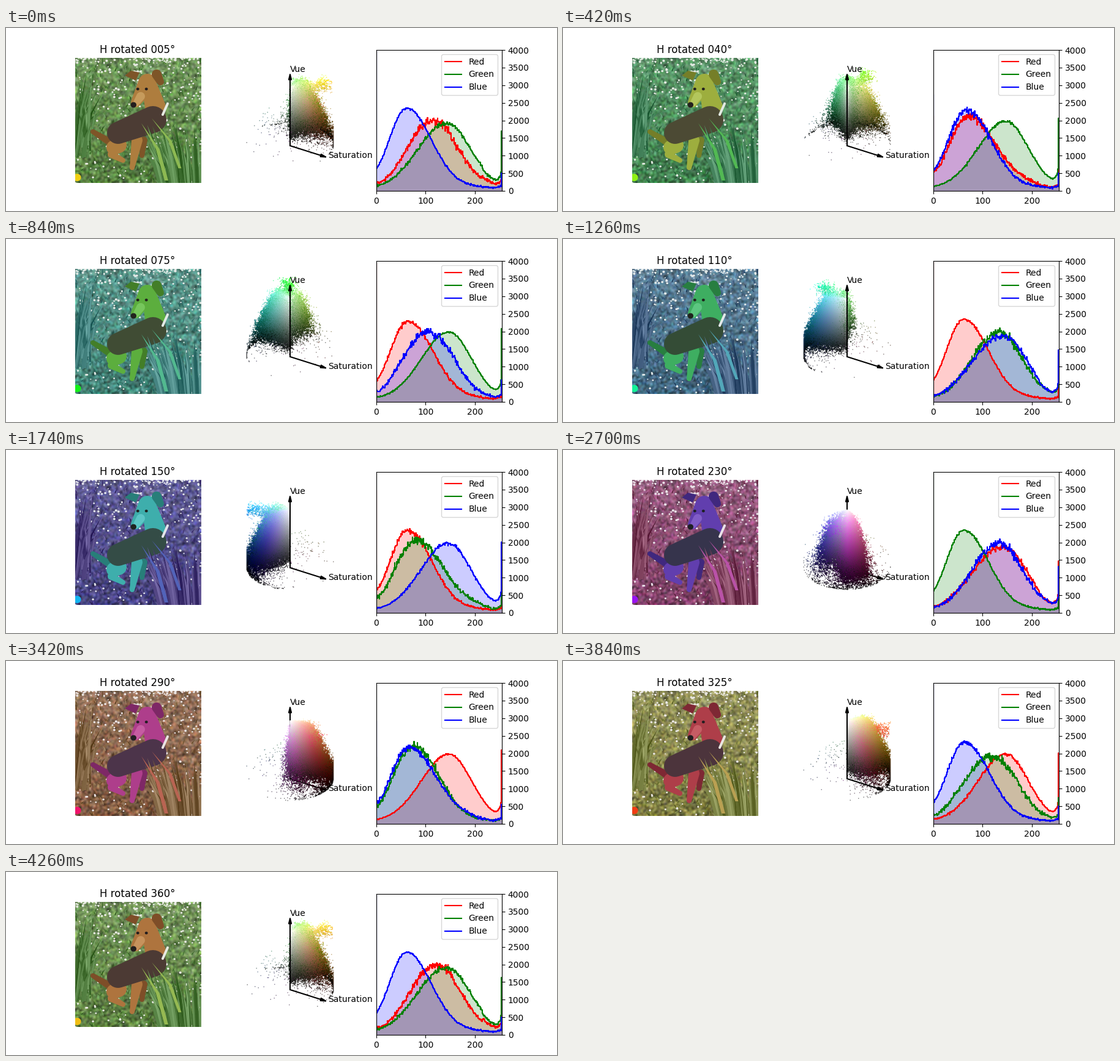
Write a matplotlib script that moves like this. It is 900 px wide and 300 px high and loops after 4.32 s.

```python
from itertools import product

import matplotlib.pyplot as plt
import numpy as np
from matplotlib.animation import FuncAnimation
from matplotlib.collections import PolyCollection
from matplotlib.colors import hsv_to_rgb, rgb_to_hsv
from matplotlib.patches import FancyArrowPatch, Rectangle

FRAMES, INTERVAL, STEP = 72, 60, 5
rng = np.random.default_rng(4)

fig = plt.figure(figsize=(9, 3), dpi=100)
stage = fig.add_axes([0, 0, 1, 1])
stage.axis("off")


def spin(hsv, deg):
    """Rotate the hue of an HSV array and return RGB."""
    out = np.array(hsv, float)
    out[..., 0] = (out[..., 0] + deg / 360) % 1
    return hsv_to_rgb(out)


# --- pixel population shared by the colour cloud and the histograms ---
N = 2 ** 17
WEIGHT = 2
LEVELS = np.arange(256)


def hump(peak, left, right):
    width = np.where(LEVELS < peak, left, right)
    return np.exp(-((LEVELS - peak) / width) ** 2 / 2)


def sample(z, pdf):
    """Give values ordered like z the distribution pdf."""
    rank = z.argsort().argsort() / N
    return np.searchsorted(np.cumsum(pdf) / pdf.sum(), rank, side="right")


def make_pixels():
    glow = np.exp((LEVELS - 255) / 6)
    high_pdf = 1980 * hump(148, 56, 46) + 60 + 500 * glow
    low_pdf = 2230 * hump(62, 35, 50) + 100 + 150 * glow
    high_pdf[0], high_pdf[-1] = 0, 2200
    low_pdf[0], low_pdf[-1] = 4500, 900

    z = rng.normal(size=N)
    high = sample(z, high_pdf)
    low = np.minimum(sample(0.86 * z + 0.51 * rng.normal(size=N), low_pdf), high)

    brown = rng.random(N) < 0.13
    hue = np.where(brown, 24, 80) + rng.normal(size=N) * (10 + 300 / (high + 20))
    yellow = (high > 215) & (rng.random(N) < 0.1)
    low[yellow] = rng.integers(0, 160, yellow.sum())
    hue[yellow] = rng.normal(48, 6, yellow.sum())
    hue += 220 * rng.normal(size=N) / (high - low + 6)
    stray = (high < 110) & (rng.random(N) < 0.01)
    hue[stray] = rng.uniform(0, 360, stray.sum())
    return np.column_stack([hue / 360 % 1, (high - low) / np.maximum(high, 1), high / 255])


pixels = make_pixels()

# --- picture: flat shapes over a soft meadow ---
X0, X1, Y0, Y1 = 113, 319, 49, 254
FUR, SHADE, LIGHT = (174, 116, 62), (126, 78, 40), (198, 146, 92)
VEST, DARK, WHITE = (76, 58, 52), (36, 30, 30), (232, 234, 226)
YELLOW, SPROUT = (240, 190, 20), (150, 185, 82)
shapes, tones = [], []


def add(points, rgb):
    shapes.append(np.array(points, float))
    tones.append(np.array(rgb) / 255)


def limb(p, q, r0, r1, rgb):
    """Rounded, tapered stroke from p to q."""
    p, q = np.array(p), np.array(q)
    d = q - p
    turn = np.arctan2(d[1], d[0])
    open_ = np.arccos(np.clip((r0 - r1) / np.hypot(*d), -1, 1))
    a = turn + np.linspace(open_, 2 * np.pi - open_, 16)
    b = turn + np.linspace(-open_, open_, 16)
    add(np.vstack([p + r0 * np.column_stack([np.cos(a), np.sin(a)]),
                   q + r1 * np.column_stack([np.cos(b), np.sin(b)])]), rgb)


def dot(x, y, r, rgb):
    limb((x, y), (x + 0.5, y), r, r, rgb)


def blade(base, tip, width, rgb):
    base, tip = np.array(base), np.array(tip)
    bend = base + (tip - base) * (0.35, 0.55)
    side = np.array([width, 0])
    add([base - side, bend - side, tip, bend + side, base + side], rgb)


def leaf_tone():
    return np.array([80, 124, 62]) + rng.uniform(-40, 45)


for _ in range(380):
    x, y = rng.uniform(X0, X1), rng.uniform(Y0, Y1)
    blade((x, y), (x + rng.normal(0, 4), y - rng.uniform(4, 10)), 0.8, leaf_tone())
for _ in range(330):
    dot(rng.uniform(X0, X1), Y0 + 205 * rng.random() ** 1.8, rng.uniform(0.7, 1.9), WHITE)
for _ in range(45):
    blade((rng.uniform(110, 138), rng.uniform(170, 215)),
          (rng.uniform(111, 158), rng.uniform(66, 150)), rng.uniform(1, 2.2), leaf_tone())

limb((142, 170), (168, 186), 4, 6, SHADE)
limb((184, 192), (176, 196), 13, 12, FUR)
limb((172, 207), (191, 217), 6, 4, FUR)
limb((225, 184), (222, 209), 6, 4, SHADE)
limb((214, 184), (206, 229), 9, 4, FUR)
limb((236, 100), (244, 130), 13, 17, FUR)
limb((183, 172), (240, 150), 18, 22, VEST)
limb((256, 142), (264, 124), 2, 2, WHITE)
add([(194, 78), (204, 70), (218, 73), (212, 86)], SHADE)
limb((231, 90), (212, 122), 15, 8, FUR)
limb((220, 112), (212, 124), 7, 5, LIGHT)
limb((246, 76), (252, 88), 8, 6, SHADE)
dot(208, 126, 4.5, DARK)
for x in (215, 229):
    dot(x, 100, 2.2, DARK)

for _ in range(80):
    tx = rng.uniform(226, 322)
    blade((248 + 0.75 * (tx - 222), 258), (tx, rng.uniform(156, 215)),
          rng.uniform(1.2, 2.8), leaf_tone())
blade((262, 250), (221, 156), 3, SPROUT)
blade((284, 230), (238, 148), 2.5, SPROUT)
dot(116, 245, 6, YELLOW)

tones = rgb_to_hsv(np.array(tones))
GRID = 80
fade = np.linspace(0.07, -0.04, GRID)[:, None]
noise = rng.normal(size=(3, GRID, GRID))
meadow_hsv = np.clip(np.stack([0.26 + 0.02 * noise[0],
                               0.45 + 0.1 * noise[1] - fade,
                               0.52 + 0.16 * noise[2] + fade], axis=-1), 0, 1)

meadow = stage.imshow(spin(meadow_hsv, 0), extent=(X0, X1, Y1, Y0),
                      interpolation="bicubic", aspect="auto")
photo = PolyCollection(shapes, linewidths=0, zorder=1)
stage.add_collection(photo)
photo.set_clip_path(Rectangle((X0, Y0), X1 - X0, Y1 - Y0, transform=stage.transData))
title = stage.text(215, 41, "", fontsize=12, ha="center")

# --- hue / saturation / value cloud, seen from elevation 30, azimuth -60 ---
CX, CY, RADIUS, TILT, HEIGHT = 464, 193, 71, 36, 95
LEFT, TOP, WIDE, HIGH, SS = 388, 56, 152, 180, 2
points = pixels[::2]

cloud = stage.imshow(np.zeros((HIGH, WIDE, 4)), extent=(LEFT, LEFT + WIDE, TOP + HIGH, TOP),
                     interpolation="nearest", aspect="auto")
for tip, label in (((464, 72), "Vue"), ((526.2, 212.7), "Saturation")):
    stage.add_patch(FancyArrowPatch((CX, CY), tip, lw=1.5, color="k", mutation_scale=10,
                                    arrowstyle="-|>,head_length=0.6,head_width=0.15",
                                    shrinkA=0, shrinkB=0, zorder=3))
    stage.text(*tip, label, fontsize=10, zorder=6)
stage.set_xlim(0, 900)
stage.set_ylim(300, 0)


def cloud_image(rgb, deg):
    hue = 2 * np.pi * points[:, 0] + np.radians(deg)
    sat, val = points[:, 1], points[:, 2]
    near = sat * np.cos(hue + np.pi / 3)
    order = np.argsort(0.866 * near + 0.75 * val)
    x = CX + RADIUS * sat * np.cos(hue - np.pi / 6) - LEFT
    y = CY + TILT * near - HEIGHT * val - TOP
    ix, iy = (SS * x[order]).astype(int), (SS * y[order]).astype(int)
    dots = np.column_stack([rgb[order], np.ones(len(order))])
    img = np.zeros((HIGH * SS, WIDE * SS, 4))
    around = list(product((-1, 0, 1), repeat=2))
    for dx, dy in around:
        img[iy + dy, ix + dx] = dots
    img = img.reshape(HIGH, SS, WIDE, SS, 4).mean(axis=(1, 3))
    alpha = img[..., 3].copy()
    img[..., :3] /= np.maximum(alpha, 1e-6)[..., None]
    # lone dots look fainter than the packed core
    crowd = np.mean([np.roll(alpha, shift, (0, 1)) for shift in around], axis=0)
    img[..., 3] = alpha * (0.3 + 0.7 * crowd)
    return np.clip(img, 0, 1)


# --- histograms ---
hist = fig.add_axes([604.85 / 900, 0.11, 205.15 / 900, 0.77])
hist.set_xlim(0, 255)
hist.set_ylim(0, 4000)
hist.yaxis.tick_right()
hist.set_xticks([0, 100, 200])
hist.set_yticks(range(0, 4001, 500))
fills, lines = [], []
for name in ("Red", "Green", "Blue"):
    color = name.lower()
    fills.append(hist.stairs(0 * LEVELS, np.arange(-1, 256), fill=True, color=color,
                             alpha=0.2, lw=0))
    lines += hist.step(LEVELS, 0 * LEVELS, where="pre", color=color, label=name)
hist.legend(handles=lines, loc="upper right")


def update(i):
    deg = STEP * (i + 1)
    title.set_text(f"H rotated {deg:03d}°")
    meadow.set_data(spin(meadow_hsv, deg))
    photo.set_facecolor(spin(tones, deg))

    rgb = spin(pixels, deg)
    cloud.set_data(cloud_image(rgb[::2], deg))
    cloud.set_zorder(4 if 155 < deg < 325 else 2)

    for channel, fill, line in zip(np.rint(rgb * 255).astype(int).T, fills, lines):
        counts = WEIGHT * np.bincount(channel, minlength=256)
        fill.set_data(counts)
        line.set_ydata(counts)


anim = FuncAnimation(fig, update, frames=FRAMES, interval=INTERVAL,
                     repeat=True, repeat_delay=0, blit=False)
plt.show()
```
